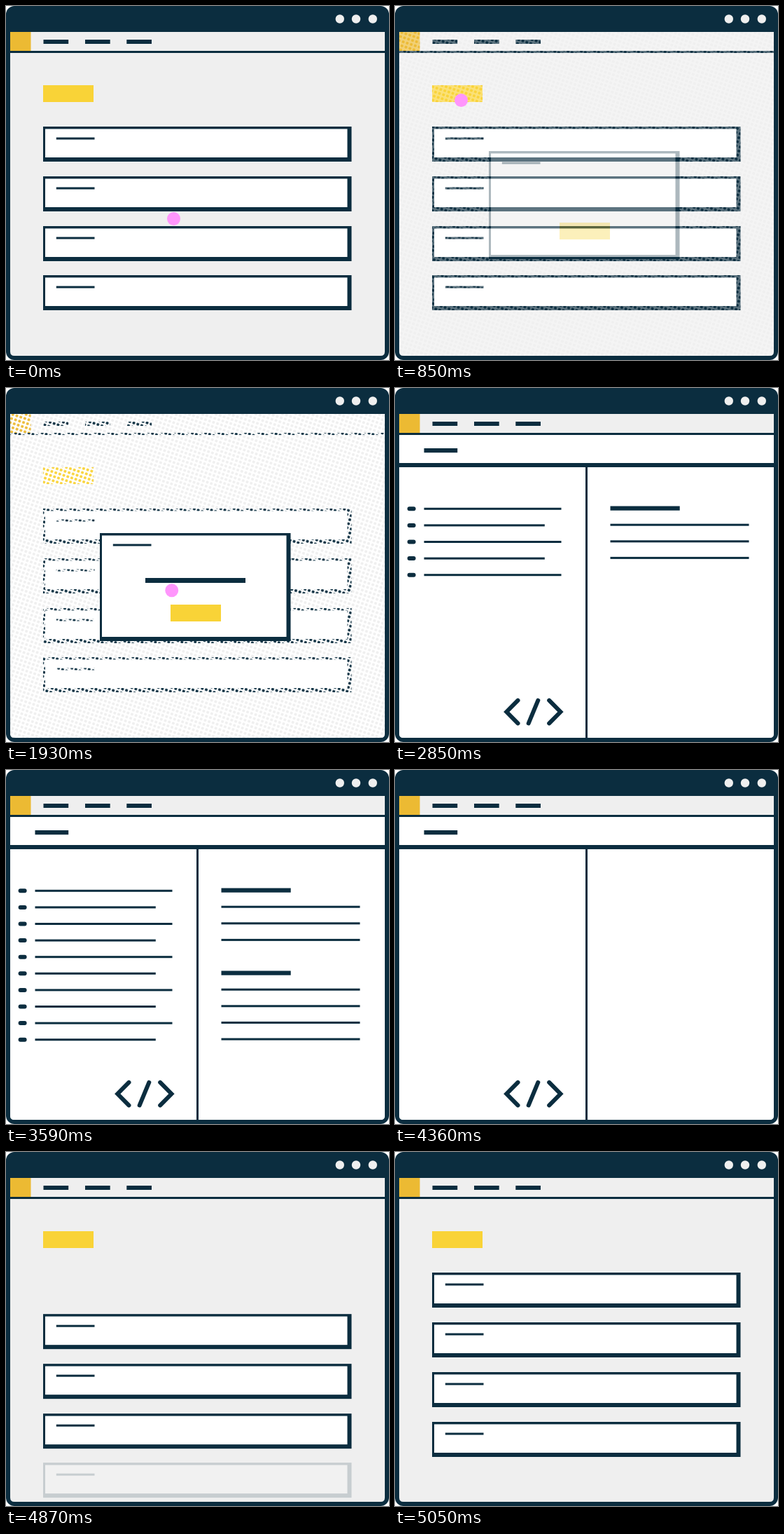
Write an HTML page that moves like this. It is 547 by 505 pixels and loops after 5.44 s.

```html
<!DOCTYPE html>
<html lang="en">
<head>
<meta charset="utf-8">
<title>Create and edit flow</title>
<style>
  html, body { margin: 0; width: 100%; height: 100%; overflow: hidden; background: #fff; }
  svg { display: block; width: 547px; height: 505px; }
</style>
</head>
<body>
<svg id="stage" viewBox="0 0 547 505" xmlns="http://www.w3.org/2000/svg">
  <defs>
    <clipPath id="inside"><path d="M6 37H541V493Q541 499 535 499H12Q6 499 6 493Z"/></clipPath>
    <pattern id="dots" width="6" height="6" patternUnits="userSpaceOnUse" patternTransform="rotate(18)">
      <rect width="6" height="6" fill="#fff"/>
      <circle cx="3" cy="3" r="2.1" fill="#000"/>
    </pattern>
    <mask id="screen" maskUnits="userSpaceOnUse" x="0" y="0" width="547" height="505">
      <rect width="547" height="505" fill="url(#dots)"/>
      <rect x="134" y="207" width="272.5" height="154" fill="#000"/>
    </mask>
  </defs>
  <rect width="547" height="505" rx="12" fill="#0b2d3f"/>
  <g fill="#efefef">
    <circle cx="476.8" cy="18.5" r="6.2"/>
    <circle cx="500" cy="18.5" r="6.2"/>
    <circle cx="523.8" cy="18.5" r="6.2"/>
  </g>
  <g clip-path="url(#inside)">
    <g id="page"></g>
    <rect id="veil" x="6" y="37" width="535" height="462" fill="#fff" mask="url(#screen)"/>
    <g id="modal"></g>
    <g id="editor"></g>
  </g>
  <circle id="cursor" r="9.5" fill="#ff96fc"/>
</svg>
<script>
const LOOP = 5440, TICK = 30;
const NAVY = '#0b2d3f', GREY = '#efefef', YELLOW = '#f9d337';
const $ = id => document.getElementById(id);

function add(parent, tag, attrs = {}) {
  const el = document.createElementNS('http://www.w3.org/2000/svg', tag);
  for (const key in attrs) el.setAttribute(key, attrs[key]);
  return parent.appendChild(el);
}
const rect = (parent, x, y, width, height, fill = NAVY, rx = 0) =>
  add(parent, 'rect', { x, y, width, height, fill, rx });

function panel(parent, x, y, w, h) {
  const g = add(parent, 'g');
  rect(g, x, y, w, h);
  rect(g, x + 3, y + 3.4, w - 9, h - 9.4, '#fff');
  rect(g, x + 18.8, y + 15.5, 54.7, 3);
  return g;
}

function header(parent) {
  rect(parent, 6, 37, 535, 27, GREY);
  rect(parent, 6, 37, 29.5, 27, '#ecba33');
  for (const x of [53.5, 113, 172.3]) rect(parent, x, 48, 35.7, 6);
  rect(parent, 6, 64, 535, 3);
}

// List page
rect($('page'), 6, 37, 535, 462, GREY);
header($('page'));
rect($('page'), 53, 113, 72, 24, YELLOW);
const cards = [172, 243, 314, 384].map(y => panel($('page'), 53, y, 440.5, 50));
const newCard = panel($('page'), 53, 172, 440.5, 50);

// Dialog
panel($('modal'), 134, 207, 272.5, 154);
rect($('modal'), 235, 309, 72, 24, YELLOW);
const typed = rect($('modal'), 199, 271, 0, 7);

// Editor
const editor = $('editor');
rect(editor, 6, 37, 535, 462, '#fff');
header(editor);
rect(editor, 41.5, 86, 47.7, 6.2);
rect(editor, 6, 107, 535, 6);
rect(editor, 272, 113, 3, 386);
add(editor, 'path', {
  d: 'M175.5 445.7L159.3 462L175.5 478.3M204.3 445.7L190.7 478.3M220.2 445.7L236.4 462L220.2 478.3',
  fill: 'none', stroke: NAVY, 'stroke-width': 6, 'stroke-linecap': 'round'
});

const ROW_TIMES = [2190, 2510, 2680, 2850, 2850, 3050, 3050, 3220, 3390, 3590, 3760, 3760];
const rows = ROW_TIMES.map((time, i) => {
  const g = add(editor, 'g'), y = 172.3 + 23.6 * i;
  rect(g, 17.6, y - 3, 12, 6, NAVY, 3);
  rect(g, 41.5, y - 1.5, i % 2 ? 172.3 : 196, 3);
  if (i === 0 || i === 5) rect(g, 307.5, y - 3.8, 99.2, 6.2);
  else if (i !== 4 && i !== 11) rect(g, 307.5, y - 2.2, 198, 3);
  return { g, time };
});

const progress = (t, start, count) =>
  Math.max(0, Math.min(count, Math.floor((t - start) / TICK) + 1)) / count;
const mix = (a, b, p) => a + (b - a) * p;
const fade = (el, value) => el.setAttribute('opacity', value);
const show = (el, on) => el.setAttribute('visibility', on ? 'visible' : 'hidden');

function cursorAt(t) {
  if (t < 550) {
    const p = progress(t, 30, 14);
    return [mix(239.5, 91.5, p), mix(303.5, 131.5, p)];
  }
  const p = progress(t, 1600, 15);
  return [mix(94.5, 272.3, p), mix(134.5, 327.3, p)];
}

function render(t) {
  const dialog = t < 2340 ? progress(t, 850, 3) : 0;
  fade($('veil'), dialog);
  fade($('modal'), dialog);
  typed.setAttribute('width', 143 * progress(t, 1100, 12));

  const opened = progress(t, 2190, 6);
  fade(editor, t < 4360 ? opened : 1 - progress(t, 4390, 3));
  rows.forEach(({ g, time }) => show(g, t >= time && t < 4360));

  const [x, y] = cursorAt(t);
  $('cursor').setAttribute('cx', x);
  $('cursor').setAttribute('cy', y);
  fade($('cursor'), t < 5440 ? 1 - opened : 1);

  // Every card moves down one slot, then a new one fades in on top
  const shift = progress(t, 4750, 6);
  cards.forEach(card => card.setAttribute('transform', `translate(0 ${71 * shift})`));
  fade(cards[3], 1 - shift);
  fade(newCard, progress(t, 4930, 5));
}

const origin = performance.now();
function frame() {
  render((performance.now() - origin + 0.5) % LOOP);
  requestAnimationFrame(frame);
}
render(0);
requestAnimationFrame(frame);
</script>
</body>
</html>
```
